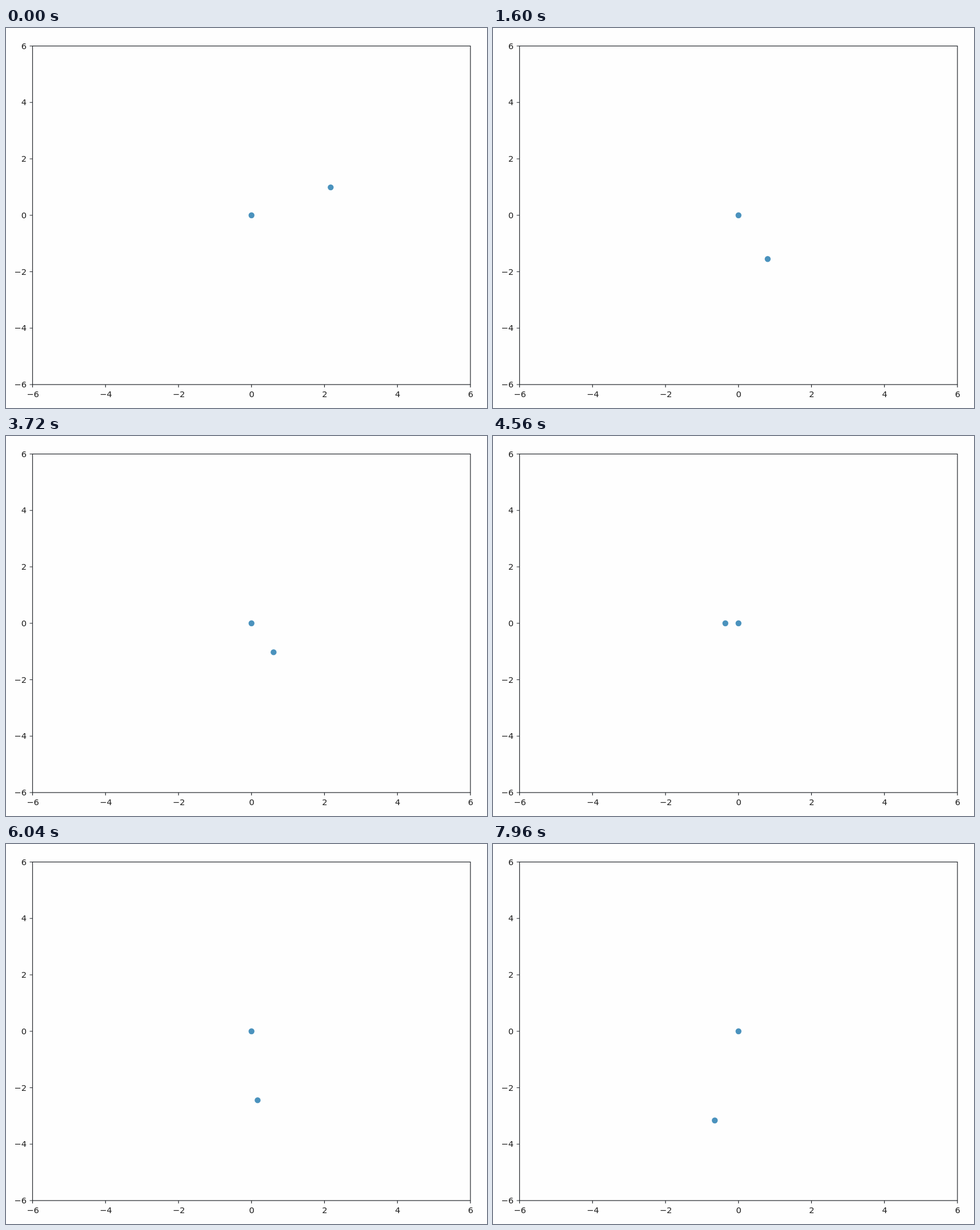
Write an HTML page that moves like this. It is 842 px wide and 665 px high and loops after 8 s.

```html
<!DOCTYPE html>
<html lang="en">
<head>
<meta charset="utf-8">
<title>Spring pendulum</title>
<style>
  html, body { margin: 0; width: 100%; height: 100%; overflow: hidden; background: #fefefe; }
  svg { display: block; width: 842px; height: 665px; }
  .axis { fill: none; stroke: #22262b; stroke-width: 1.2; }
  text { font: 14.7px "DejaVu Sans", sans-serif; fill: #202020; }
  circle { fill: #4a92bd; }
</style>
</head>
<body>
<svg viewBox="0 0 842 665"></svg>
<script>
const LOOP = 8000, STEP = 40, LIMIT = 6;
const box = { x: 46.5, y: 31.5, width: 766.5, height: 592.5 };
const bottom = box.y + box.height;
const toX = v => box.x + box.width * (v + LIMIT) / (2 * LIMIT);
const toY = v => bottom - box.height * (v + LIMIT) / (2 * LIMIT);

const svg = document.querySelector("svg");

function add(tag, attrs, text = "") {
  const el = document.createElementNS("http://www.w3.org/2000/svg", tag);
  for (const name in attrs) el.setAttribute(name, attrs[name]);
  el.textContent = text;
  return svg.appendChild(el);
}

function addDot() {
  return add("circle", { cx: toX(0), cy: toY(0), r: 5.2 });
}

add("rect", { class: "axis", ...box });
for (let v = -LIMIT; v <= LIMIT; v += 2) {
  const label = String(v).replace("-", "\u2212");
  const x = toX(v), y = toY(v);
  add("path", { class: "axis", d: `M${x} ${bottom}v5M${box.x} ${y}h-5` });
  add("text", { x: x + 0.5, y: 646, "text-anchor": "middle" }, label);
  add("text", { x: 36, y: y + 5.2, "text-anchor": "end" }, label);
}
addDot();
const bob = addDot();

// Key poses of the bob in axis units; the spring pulls it inwards between them.
const poses = [
  { t: 0, x: 2.17, y: 0.99 },
  { t: 1600, x: 0.8, y: -1.55 },
  { t: 2840, x: 3.21, y: -1.59 },
  { t: 4560, x: -0.36, y: 0 },
  { t: 5400, x: 0.53, y: -3.8 },
  { t: 6720, x: 0.07, y: -3.55 },
  { t: 7960, x: -0.65, y: -3.16 }
];
const rest = { x: 0, y: -1.4 }, PULL = 0.6;

function slope(i, axis) {
  const a = poses[Math.max(i - 1, 0)];
  const b = poses[Math.min(i + 1, poses.length - 1)];
  return (b[axis] - a[axis]) / (b.t - a.t);
}

function position(time, axis) {
  const i = poses.findLastIndex((p, n) => p.t <= time && n < poses.length - 1);
  const a = poses[i], b = poses[i + 1];
  const span = b.t - a.t, u = (time - a.t) / span, w = 1 - u;
  const swing = w * w * ((1 + 2 * u) * a[axis] + u * span * slope(i, axis))
              + u * u * ((3 - 2 * u) * b[axis] - w * span * slope(i + 1, axis));
  const pull = PULL * Math.sin(Math.PI * u) ** 2;
  return swing + (rest[axis] - swing) * pull;
}

const start = performance.now();

function draw() {
  const elapsed = Math.max(0, performance.now() - start) % LOOP;
  const time = Math.floor(elapsed / STEP) * STEP;
  bob.setAttribute("cx", toX(position(time, "x")));
  bob.setAttribute("cy", toY(position(time, "y")));
  requestAnimationFrame(draw);
}
draw();
</script>
</body>
</html>
```
